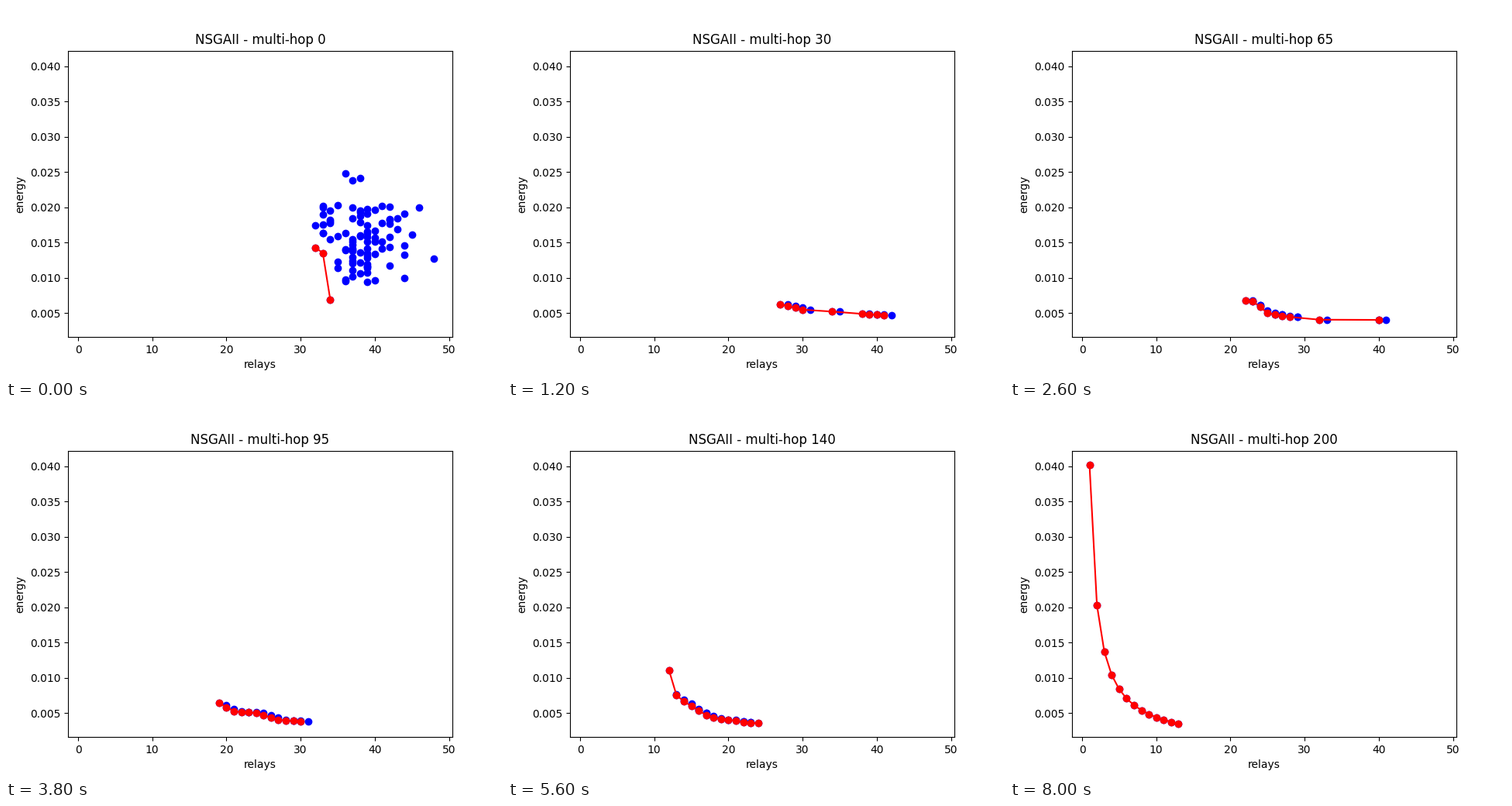
Recreate the animation shown at these times as a matplotlib script. Size 640 by 480 pixels, loop 8.2 s.

```python
import numpy as np
import matplotlib.pyplot as plt
from matplotlib.animation import FuncAnimation

STEP = 5      # generations per frame
FRAMES = 41
SLACK = 3     # how far dominated points sit above the front

# Energies are in units of 1e-4 until they are drawn.


def start():
    """Random first generation, with its front and a few outliers."""
    rng = np.random.default_rng(7)
    x = np.clip(rng.normal(39, 3.7, 84).round(), 33, 46)
    low = 94 + 16 * np.maximum(36 - x, 0)
    y = low + (205 - low) * rng.random(x.size)
    fixed = [(32, 143), (33, 135), (34, 69), (32, 174),
             (36, 248), (37, 238), (38, 241), (48, 127)]
    return np.vstack([np.column_stack([x, y]), fixed])


def with_followers(front):
    """Add to each front point one that needs a relay more."""
    x, y = front.T
    base = np.interp(x + 1, x, y)
    return np.vstack([front, np.column_stack([x + 1, base + np.minimum(y - base, SLACK)])])


def early(*keys):
    """Front through key points; short gaps are filled at whole relays."""
    kx, ky = np.array(keys, float).T
    xs = [kx[0]]
    for a, b in zip(kx, kx[1:]):
        xs += list(np.arange(a + 1, b + 1)) if b - a < 4 else [b]
    return with_followers(np.column_stack([xs, np.interp(xs, kx, ky)]))


def hyperbola(first, last, scale=1.0):
    x = np.arange(first, last + 1.0)
    return np.column_stack([x, np.maximum(4.2 + 398 * scale / x, 36 - x / 12)])


# (generation, population, easing power towards the next stage)
STAGES = [
    (0, start(), 0.4),
    (30, early((27, 62.5), (30, 54.7), (34, 52), (38, 48.8), (41, 47)), 1),
    (65, early((22, 68), (23, 67), (25, 50), (28, 44.4), (32, 40.5), (40, 40.2)), 1),
    (95, early((19, 64), (21, 52.5), (24, 50), (27, 40.4), (30, 38)), 1),
    (120, early((18, 90), (19, 54.7), (22, 45), (25, 40.4), (27, 36.4)), 1.4),
    (160, with_followers(hyperbola(3, 17, 1.05)), 1),
    (180, with_followers(hyperbola(1, 14)), 1),
    (200, hyperbola(1, 13), 1),
]


def by_rank(pts, n):
    pts = pts[np.lexsort((pts[:, 1], pts[:, 0]))]
    return pts[np.linspace(0, len(pts) - 1, n).round().astype(int)]


def population(gen):
    """Blend the two neighbouring stages, rank by rank."""
    for (g0, a, power), (g1, b, _) in zip(STAGES, STAGES[1:]):
        if gen < g1:
            n = max(len(a), len(b))
            t = ((gen - g0) / (g1 - g0)) ** power
            pts = (1 - t) * by_rank(a, n) + t * by_rank(b, n)
            pts[:, 0] = np.ceil(pts[:, 0] - 0.5)
            return pts
    return STAGES[-1][1]


def pareto(pts):
    front, best = [], np.inf
    for x, y in by_rank(pts, len(pts)):
        if y < best:
            front.append((x, y))
            best = y
    return np.array(front)


fig, ax = plt.subplots(figsize=(6.4, 4.8), dpi=100)
cloud, = ax.plot([], [], "o", color="blue")
line, = ax.plot([], [], "o-", color="red")
ax.set(xlim=(-1.36, 50.47), ylim=(0.00158, 0.04224), xlabel="relays", ylabel="energy")


def update(i):
    gen = i * STEP
    pts = population(gen)
    for artist, data in ((cloud, pts), (line, pareto(pts))):
        artist.set_data(data[:, 0], data[:, 1] * 1e-4)
    ax.set_title(f"NSGAII - multi-hop {gen}")
    return cloud, line


anim = FuncAnimation(fig, update, frames=FRAMES, interval=200, repeat=True,
                     repeat_delay=0, blit=False)
plt.show()
```
